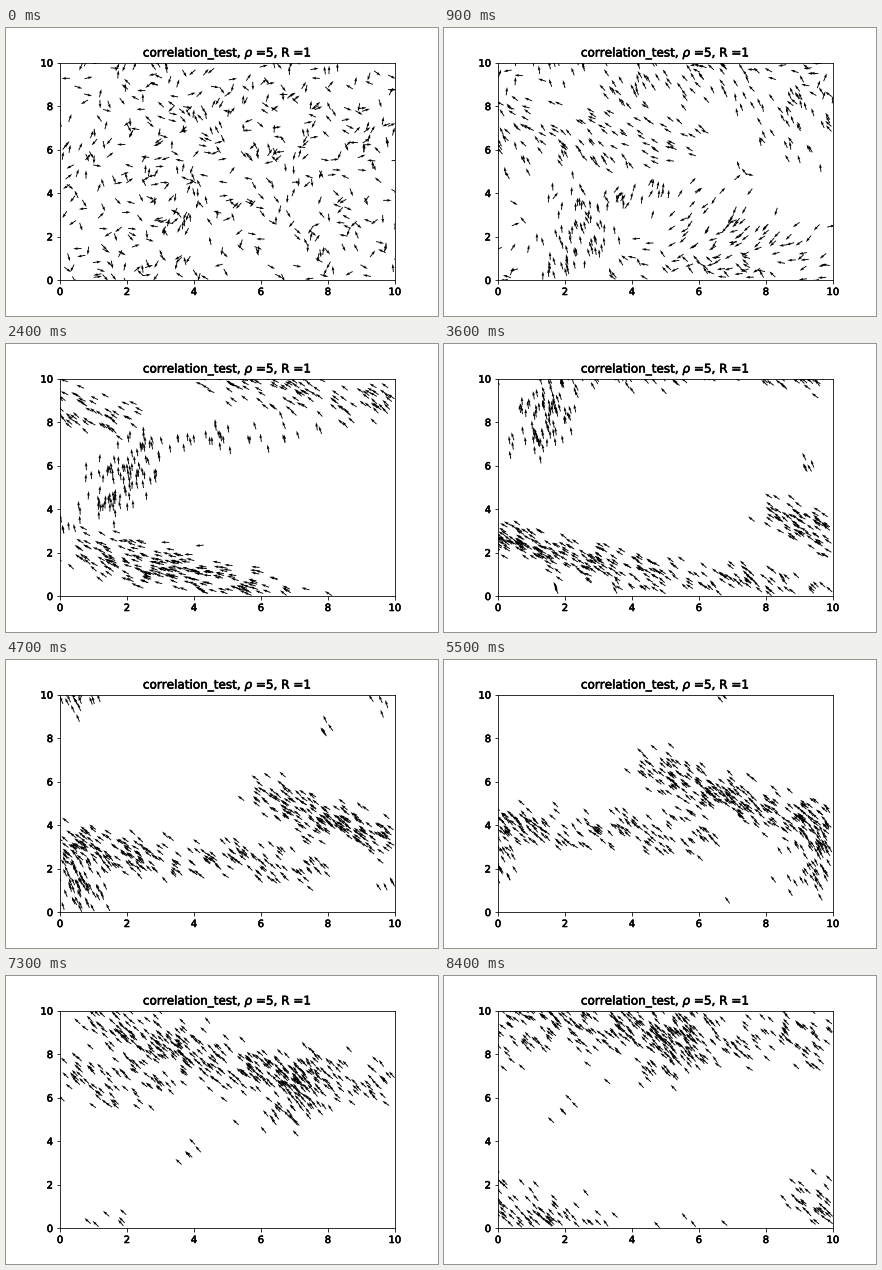
Animation of 432 by 288 pixels, one loop 8500 ms. Source, as a matplotlib script:

```python
import numpy as np
import matplotlib.pyplot as plt
from matplotlib.animation import FuncAnimation
from matplotlib.patheffects import withStroke

SIZE, SPEED = 10, 0.25      # box side, distance per step
HOLD, STEPS = 4, 80         # still frames before the first step, steps per loop
ORDERED, ANCHOR = 11, 32    # step where flocks have formed, step where they are placed
FINAL = 136                 # common heading in degrees

rng = np.random.default_rng(5)


def wrap(d):
    return (d + SIZE / 2) % SIZE - SIZE / 2


def stream(n, xs, ys, early, late, spread, shear=0):
    """Scatter n birds along a curve; shear turns early headings across it."""
    t = rng.random(n)
    knots = np.linspace(0, 1, len(xs))
    across = np.clip(rng.normal(0, spread, n), -2 * spread, 2 * spread)
    x = np.interp(t, knots, xs) + rng.normal(0, spread, n)
    y = np.interp(t, knots, ys) + across
    h0 = np.interp(t, knots, early) + shear * across
    return np.stack([x, y, h0, np.interp(t, knots, late)])


def make_swarm():
    band = stream(370, [8.3, 9.7, 11, 12.7, 14.5, 17.3, 19.6],
                  [3.9, 2.7, 2.2, 1.5, 1.0, 0.6, -0.2],
                  [146, 168, 184, 172, 142, 140, 156],
                  [146, 146, 147, 147, 146, 142, 136], 0.42, 18)
    plume = stream(125, [1.1, 1.4, 1.6, 1.9, 5.8], [6.6, 7.7, 8.8, 9.9, 9.8],
                   [86, 90, 94, 84, 80], [97, 100, 104, 110, 140], 0.4)
    strays = stream(5, [9.2, 9.4], [5.3, 6.2], [90, 90], [114, 114], 0.1)
    return np.concatenate([band, plume, strays], axis=1)


def headings(early, late):
    n = len(early)
    k = np.arange(STEPS + 1)[:, None]
    turning = early + (late - early) * (k - ORDERED) / (ANCHOR - ORDERED)
    settling = FINAL + (late - FINAL) * np.exp(-(k - ANCHOR) / 22)
    head = np.where(k < ANCHOR, turning, settling)
    head = head + rng.normal(0, 8, n) * (0.3 + np.exp(-k / 15))
    head += rng.normal(0, 2.5, head.shape)
    spin = rng.uniform(-180, 180, n) * np.exp(-k / 2)
    head = np.where(k < ORDERED, head[ORDERED] + spin, head)
    return np.radians(head)


def pair_up(points, starts, rounds=12):
    """Give each point a nearby start by swapping pairs that shorten the total."""
    cost = (wrap(points[:, None] - starts[None]) ** 2).sum(2)
    n = len(points)
    pick, rows = np.arange(n), np.arange(n)
    for _ in range(rounds):
        for i in range(n):
            gain = (cost[i, pick] + cost[rows, pick[i]]
                    - cost[i, pick[i]] - cost[rows, pick])
            j = gain.argmin()
            if gain[j] < -1e-9:
                pick[i], pick[j] = pick[j], pick[i]
    return starts[pick]


def build_paths():
    x, y, early, late = make_swarm()
    n = len(x)
    head = headings(early, late)
    moves = SPEED * np.stack([np.cos(head), np.sin(head)], axis=2)
    path = np.concatenate([np.zeros((1, n, 2)), moves.cumsum(axis=0)])
    path += np.stack([x, y], axis=1) - path[ANCHOR]
    # Bend the first steps so that the swarm begins evenly scattered.
    shift = wrap(pair_up(path[0], rng.uniform(0, SIZE, (n, 2))) - path[0])
    u = np.arange(ORDERED + 1)[:, None, None] / ORDERED
    path[:ORDERED + 1] += shift * (1 - u * u * (3 - 2 * u))
    step = np.diff(path, axis=0)
    return path[:-1] % SIZE, np.arctan2(step[..., 1], step[..., 0])


pos, angle = build_paths()

fig = plt.figure(figsize=(6, 4), dpi=72, facecolor="white")
ax = fig.add_axes([0.125, 0.125, 0.775, 0.755])
ticks = range(0, SIZE + 1, 2)
ax.set(xlim=(0, SIZE), ylim=(0, SIZE), xticks=ticks, yticks=ticks)
ax.set_title(r"correlation_test, $\rho$ =5, R =1")
plt.setp([ax.title, *ax.get_xticklabels(), *ax.get_yticklabels()],
         path_effects=[withStroke(linewidth=0.6, foreground="black")])
arrows = ax.quiver(pos[0, :, 0], pos[0, :, 1], np.cos(angle[0]), np.sin(angle[0]))


def update(i):
    k = max(0, i - HOLD)
    arrows.set_offsets(pos[k])
    arrows.set_UVC(np.cos(angle[k]), np.sin(angle[k]))
    return arrows,


anim = FuncAnimation(fig, update, frames=HOLD + STEPS + 1, interval=100,
                     repeat=True, repeat_delay=0)
plt.show()
```
